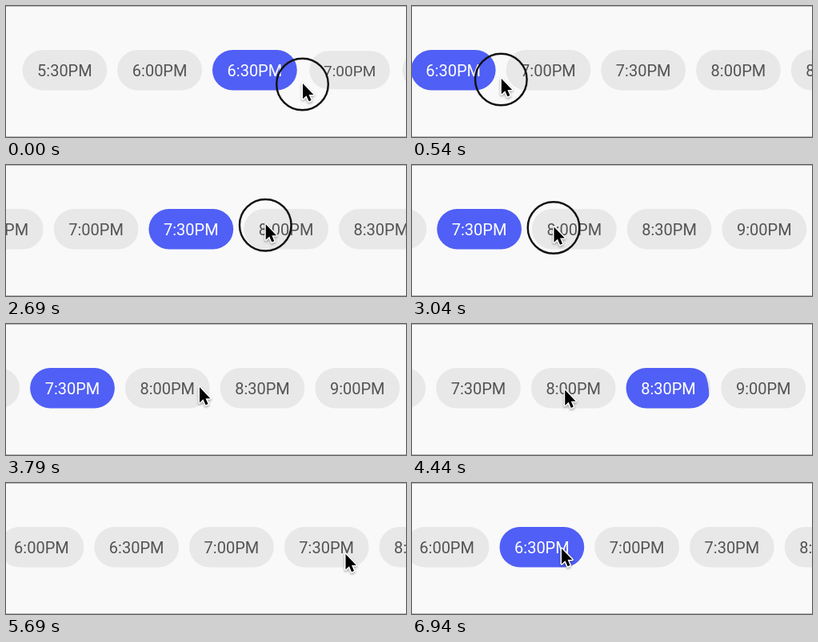
Animation, 500 px wide and 164 px high, one loop 6.99 s. Source, as an HTML page with a canvas:

```html
<!DOCTYPE html>
<html lang="en">
<head>
<meta charset="utf-8">
<title>Time chips</title>
<style>
  html, body { margin: 0; width: 100%; height: 100%; overflow: hidden; background: #f9f9f9; }
  canvas { display: block; width: 500px; height: 164px; }
</style>
</head>
<body>
<canvas id="stage"></canvas>
<script>
const W = 500, H = 164, LOOP = 6990;
const PITCH = 118.75, CHIP_W = 105.75, CHIP_H = 50.5, CHIP_Y = 55;
const GREY = '#e8e8e8', BLUE = '#505ff5';
const SELECT = 350, DESELECT = 185;
const LABELS = Array.from({ length: 9 }, (_, i) => `${5 + (i + 1 >> 1)}:${i % 2 ? '00' : '30'}PM`);

const START = { x: 370.5, y: 98, scroll: 20.5, chip: 2 };
// Pointer gestures: kind, start and end time, end position
const GESTURES = [
  ['drag', 20, 540, 111.3, 92],
  ['click', 840, 1375, 248, 84],
  ['move', 1880, 2400, 381, 74],
  ['drag', 2500, 3040, 177, 78.5],
  ['click', 3590, 3980, 300, 88.5],
  ['move', 4160, 4680, 106, 90],
  ['drag', 5040, 5640, 424, 90],
  ['click', 5740, 6405, 186.5, 83]
];

const canvas = document.getElementById('stage');
const ctx = canvas.getContext('2d');
const dpr = window.devicePixelRatio || 1;
canvas.width = W * dpr;
canvas.height = H * dpr;

const clamp = v => Math.min(1, Math.max(0, v));
const lerp = (a, b, k) => a + (b - a) * k;
const part = (t, a, b) => clamp((t - a) / (b - a));
const sine = k => (1 - Math.cos(Math.PI * k)) / 2;

// cubic-bezier(.4, 0, .2, 1)
function standard(x) {
  let lo = 0, hi = 1;
  for (let i = 0; i < 18; i++) {
    const u = (lo + hi) / 2, v = 1 - u;
    if (1.2 * v * v * u + 0.6 * v * u * u + u * u * u < x) lo = u; else hi = u;
  }
  return 3 * (1 - lo) * lo * lo + lo * lo * lo;
}

// Pointer and scroll; a drag carries the row along, then it settles slightly
function poseAt(t) {
  let { x, y, scroll } = START;
  for (const [kind, a, b, tx, ty] of GESTURES) {
    if (t < a) break;
    const p = part(t, a, b), k = sine(p), dx = tx - x;
    x += dx * k;
    y = lerp(y, ty, k);
    if (kind === 'drag') scroll += dx * k - 1.1 * sine(part(t, b, b + 150));
    else y -= 0.03 * Math.abs(dx) * Math.sin(Math.PI * p);
  }
  return { x, y, scroll };
}

// Touches and selections follow from the gestures
const touches = [];
const fills = [{ chip: START.chip, on: -SELECT, off: Infinity, x: CHIP_W / 2, y: CHIP_Y + CHIP_H / 2 }];
for (const [kind, a, b] of GESTURES) {
  if (kind === 'move') continue;
  const click = kind === 'click';
  const down = click ? b + 5 : a - 100;
  const up = click ? b + 110 : b + 40;
  const { x, y, scroll } = poseAt(down);
  const chip = Math.floor((x - scroll + 10) / PITCH);
  touches.push({ chip, down, up, release: click ? up : a + 30 });
  if (click) {
    const on = up + 75;
    fills[fills.length - 1].off = on - 15;
    fills.push({ chip, on, off: Infinity, x: x - scroll - chip * PITCH, y });
  }
}

function pressScale(chip, t) {
  return touches.filter(p => p.chip === chip).reduce((s, p) =>
    s - 0.05 * (sine(part(t, p.down, p.down + 80)) - sine(part(t, p.release, p.release + 120))), 1);
}

function fillOf(chip, t) {
  const f = fills.find(f => f.chip === chip && t >= f.on && t < f.off + DESELECT);
  if (!f) return null;
  const k = t < f.off ? standard(part(t, f.on, f.on + SELECT)) : 1 - standard(part(t, f.off, f.off + DESELECT));
  return { k, x: f.x, y: f.y };
}

function drawChip(i, x, t) {
  const s = pressScale(i, t), fill = fillOf(i, t);
  const cx = x + CHIP_W / 2, cy = CHIP_Y + CHIP_H / 2;
  ctx.save();
  ctx.translate(cx, cy);
  ctx.scale(s, s);
  ctx.translate(-cx, -cy);

  const full = fill && fill.k > 0.99;
  ctx.beginPath();
  ctx.roundRect(x, CHIP_Y, CHIP_W, CHIP_H, CHIP_H / 2);
  ctx.fillStyle = full ? BLUE : GREY;
  ctx.fill();
  if (fill && !full) {
    ctx.save();
    ctx.clip();
    ctx.beginPath();
    ctx.arc(x + fill.x, fill.y, fill.k * Math.max(fill.x, CHIP_W - fill.x), 0, 2 * Math.PI);
    ctx.fillStyle = BLUE;
    ctx.fill();
    ctx.restore();
  }

  const c = Math.round(lerp(84, 255, fill ? clamp(fill.k * 1.25) : 0));
  ctx.fillStyle = `rgb(${c},${c},${c})`;
  ctx.fillText(LABELS[i], cx, 88);
  ctx.restore();
}

function drawTouch(x, y) {
  ctx.beginPath();
  ctx.arc(x, y, 32.3, 0, 2 * Math.PI);
  ctx.strokeStyle = '#111';
  ctx.lineWidth = 2.4;
  ctx.stroke();
}

const arrow = new Path2D('M0 0V22L5.1 17.3L8.6 25.4L12 23.9L8.6 16H15.2Z');

function drawPointer(x, y) {
  ctx.save();
  ctx.translate(x + 0.5, y - 1);
  ctx.scale(0.88, 0.88);
  ctx.lineJoin = 'round';
  ctx.lineWidth = 3.4;
  ctx.strokeStyle = '#fff';
  ctx.shadowColor = 'rgba(0,0,0,.35)';
  ctx.shadowBlur = 3 * dpr;
  ctx.shadowOffsetY = 1.5 * dpr;
  ctx.stroke(arrow);
  ctx.shadowColor = 'transparent';
  ctx.fillStyle = '#000';
  ctx.fill(arrow);
  ctx.restore();
}

function draw(t) {
  ctx.setTransform(dpr, 0, 0, dpr, 0, 0);
  ctx.fillStyle = '#f9f9f9';
  ctx.fillRect(0, 0, W, H);
  ctx.fillStyle = '#b9b9b9';
  ctx.fillRect(0, 0, W, 1);
  ctx.fillRect(0, H - 1, W, 1);

  ctx.font = '20px Roboto, sans-serif';
  ctx.textAlign = 'center';
  const { x, y, scroll } = poseAt(t);
  LABELS.forEach((_, i) => {
    const left = scroll + i * PITCH;
    if (left > -CHIP_W && left < W) drawChip(i, left, t);
  });
  if (touches.some(p => t >= p.down && t < p.up)) drawTouch(x, y);
  drawPointer(x, y);
}

const start = performance.now();
function tick() {
  draw((performance.now() - start) % LOOP);
  requestAnimationFrame(tick);
}
tick();
</script>
</body>
</html>
```
